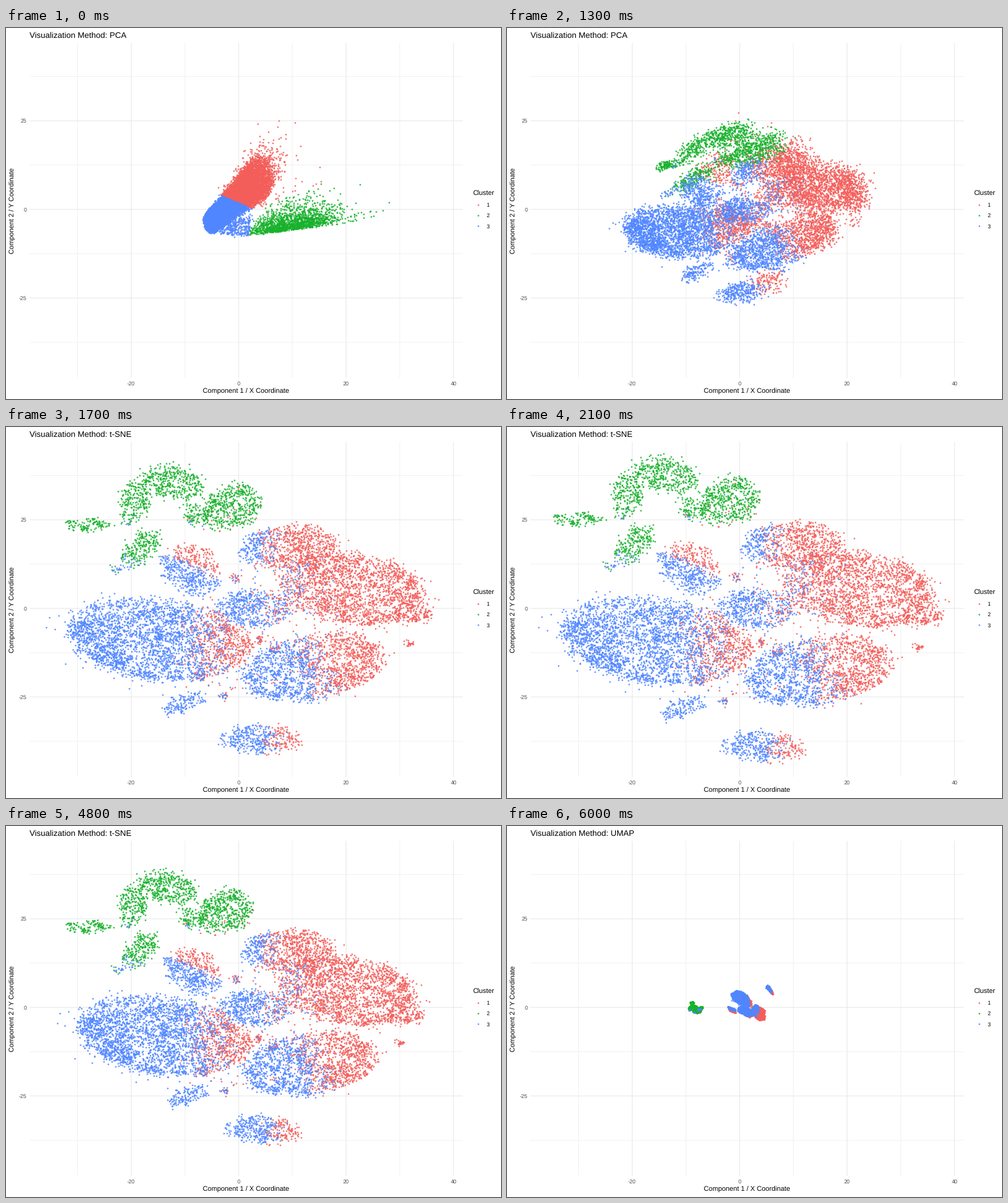
Recreate the animation shown at these times as a matplotlib script. Size 800 px wide and 600 px high, loop 8 s.

```python
import numpy as np
import matplotlib.pyplot as plt
from matplotlib.animation import FuncAnimation

plt.rcParams["font.family"] = "Liberation Sans"
plt.rcParams["text.hinting"] = "none"

W, H, DPI = 800, 600, 100
PT = 72 / DPI                      # points per pixel
UNIT = np.array([8.68, 5.73])      # pixels per data unit
RED, GREEN, BLUE = "#f35e5a", "#17b12b", "#5086ff"
COLORS = (RED, GREEN, BLUE)
CENTRES = np.array([(391, 252), (455, 319), (340, 305)])   # cluster means in PCA
STEPS = 17
rng = np.random.default_rng(5)
parts = []


# ---- point clouds (stage pixels) ----

def disc(n):
    r, a = np.sqrt(rng.random(n)), rng.uniform(0, 2 * np.pi, n)
    return np.column_stack([r * np.cos(a), r * np.sin(a)])


def clumps(cx, cy, rx, ry, tilt=0.0, density=0.09):
    """Tilted ellipse of small random clumps, with a few points strewn around."""
    n = int(np.pi * rx * ry * density)
    seeds = disc(n // 5 + 2) * 0.97
    p = np.where(rng.random((n, 1)) < 0.6, seeds[rng.integers(len(seeds), size=n)], disc(n))
    p = p * np.where(rng.random((n, 1)) < 0.03, 1.25, 1) * (rx, ry)
    c, s = np.cos(tilt), np.sin(tilt)
    soft = min(4, ry / 4)
    return p @ np.array([(c, s), (-s, c)]) + (cx, cy) + rng.normal(0, soft, (n, 2))


def spread(ellipses):
    p = np.vstack([clumps(*e) for e in ellipses])
    lo, hi = np.percentile(p, (1, 99), axis=0)
    return p, (lo + hi) / 2, (hi - lo) / 2


def shrink(p, mid, half, centre):
    """Compact copy of an island; its size follows the number of points."""
    r = 0.25 * np.sqrt(len(p))
    return centre + np.clip((p - mid) / half, -1.2, 1.2) * (r, 0.65 * r)


def mainland(ellipses, border, umap, slant=0.0):
    """Island that runs from the low-left group to the upper one across a border."""
    tsne, mid, half = spread(ellipses)
    n = len(tsne)
    away = tsne[:, 0] - border - slant * (tsne[:, 1] - mid[1])
    q = 0.5 + 0.5 * np.tanh(away / (0.7 * half[0]))[:, None]
    pca = (331, 314) + q * (79, -72) + disc(n) * ((14, 19) + q * (12, 15))
    tail = q * (rng.exponential(14, (n, 1)) - 10)
    pca += tail * np.column_stack([rng.normal(0.45, 0.25, n), np.full(n, -0.9)])
    floor = (q[:, 0] < 0.4) & (rng.random(n) < 0.06)
    pca[floor] = rng.uniform((345, 306), (394, 334), (floor.sum(), 2))
    small = shrink(tsne, mid, half, umap) + (q - 0.5) * (0, 11)
    parts.append(np.stack([pca, tsne, small]))


def upland(ellipses, x0, umap, lean=0.3):
    """Island that unrolls into the long tail on the right."""
    tsne, mid, half = spread(ellipses)
    n = len(tsne)
    d = tsne - mid
    x = x0 + lean * d[:, 0] - 1.15 * d[:, 1] + rng.normal(0, 6, n) + rng.exponential(18, n) - 12
    lift = np.clip((tsne[:, 0] - 80) / 12, 2, 25)
    y = 336 - 0.13 * (x - 392) - lift * rng.gamma(2, 0.5, n)
    x = np.where(x < 365, 730 - x, x)
    parts.append(np.stack([np.column_stack([x, y]), tsne, shrink(tsne, mid, half, umap)]))


mainland([(240, 346, 160, 69, 0.12), (115, 330, 22, 18), (163, 378, 26, 16)],
         325, (379, 282))
mainland([(402, 292, 64, 31), (568, 262, 124, 60, 0.13), (672, 308, 33, 15),
          (592, 322, 18, 4)], 455, (402, 299))
mainland([(505, 393, 122, 54, -0.15)], 508, (385, 300), 0.3)
mainland([(462, 191, 82, 39, -0.1)], 424, (408, 295))
mainland([(295, 227, 51, 36, 0.3)], 315, (363, 298), 2.2)
mainland([(413, 516, 66, 24, 0.06)], 435, (424, 266))
mainland([(282, 454, 38, 14, -0.3)], 330, (376, 284))
mainland([(x, y, 8, 7, 0, 0.14) for x, y in
          [(350, 443), (370, 243), (410, 350), (435, 362), (661, 355)]], 360, (385, 296))
mainland([(400, 330, 190, 110, 0, 0.003)], 385, (390, 298))

upland([(115, 149, 44, 10)], 451, (299, 286), -0.85)
upland([(195, 110, 23, 37, 0.1), (258, 78, 53, 27, 0.25)], 470, (300, 294))
upland([(358, 121, 51, 37, -0.4), (297, 130, 24, 14, 0.3)], 455, (307, 298))
upland([(205, 189, 38, 22, -0.9), (165, 226, 8, 8)], 420, (312, 295))

PCA, TSNE, UMAP = np.concatenate(parts, axis=1)
# the colour is the nearest cluster mean in the first view
gap = (PCA[:, None] - CENTRES) / UNIT
group = np.argmin((gap ** 2).sum(2), axis=1)


# ---- chart ----

fig = plt.figure(figsize=(W / DPI, H / DPI), dpi=DPI, facecolor="white")
ax = fig.add_axes([0, 0, 1, 1])
ax.set(xlim=(0, W), ylim=(H, 0))
ax.axis("off")


def px(v):
    return 376 + UNIT[0] * v


def py(v):
    return 293.3 - UNIT[1] * v


def label(x, y, s, size, color="black", ha="left", **kw):
    return ax.text(x, y, s, fontsize=size * PT, color=color, ha=ha, va="baseline", **kw)


def rule(x, y, width):
    ax.plot(x, y, color="#e8e8e8", lw=width * PT, solid_capstyle="butt",
            snap=False, zorder=1)


for v in range(-30, 41, 10):
    rule([px(v)] * 2, [24, 566], 0.6 if v % 20 else 1.07)
for v in np.arange(-37.5, 38, 12.5):
    rule([38, 738], [py(v)] * 2, 0.6 if v % 25 else 1.07)
for v in range(-20, 41, 20):
    label(px(v), 578, str(v), 8.8, "#4d4d4d", "center")
for v in (-25, 0, 25):
    label(33.3, py(v) + 3.3, str(v), 8.8, "#4d4d4d", "right")

label(388, 591, "Component 1 / X Coordinate", 11, ha="center")
label(13.5, 295, "Component 2 / Y Coordinate", 11, ha="center",
      rotation=90, rotation_mode="anchor")
title = label(38, 16, "", 13.2)


def dots(x, y, color):
    return ax.plot(x, y, "o", ms=2.6 * PT, mew=0, color=color, alpha=0.9, zorder=3)[0]


label(754, 271, "Cluster", 11)
for k, c in enumerate(COLORS):
    y = 285.6 + 17.28 * k
    dots([762.6], [y], c)
    label(776.7, y + 3.3, str(k + 1), 8.8)
layers = [dots([], [], c) for c in COLORS]


# ---- motion ----

def ease(u):
    u = min(max(u, 0), 1)
    return 4 * u ** 3 if u < 0.5 else 1 - 4 * (1 - u) ** 3


def update(i):
    pos = PCA + ease((i - 4) / STEPS) * (TSNE - PCA)
    pos += ease((i - 43) / STEPS) * (UMAP - pos)
    for k, layer in enumerate(layers):
        layer.set_data(*pos[group == k].T)
    method = "PCA" if i < 14 else "t-SNE" if i < 53 else "UMAP"
    title.set_text("Visualization Method: " + method)
    return [*layers, title]


anim = FuncAnimation(fig, update, frames=80, interval=100, repeat=True)
plt.show()
```
